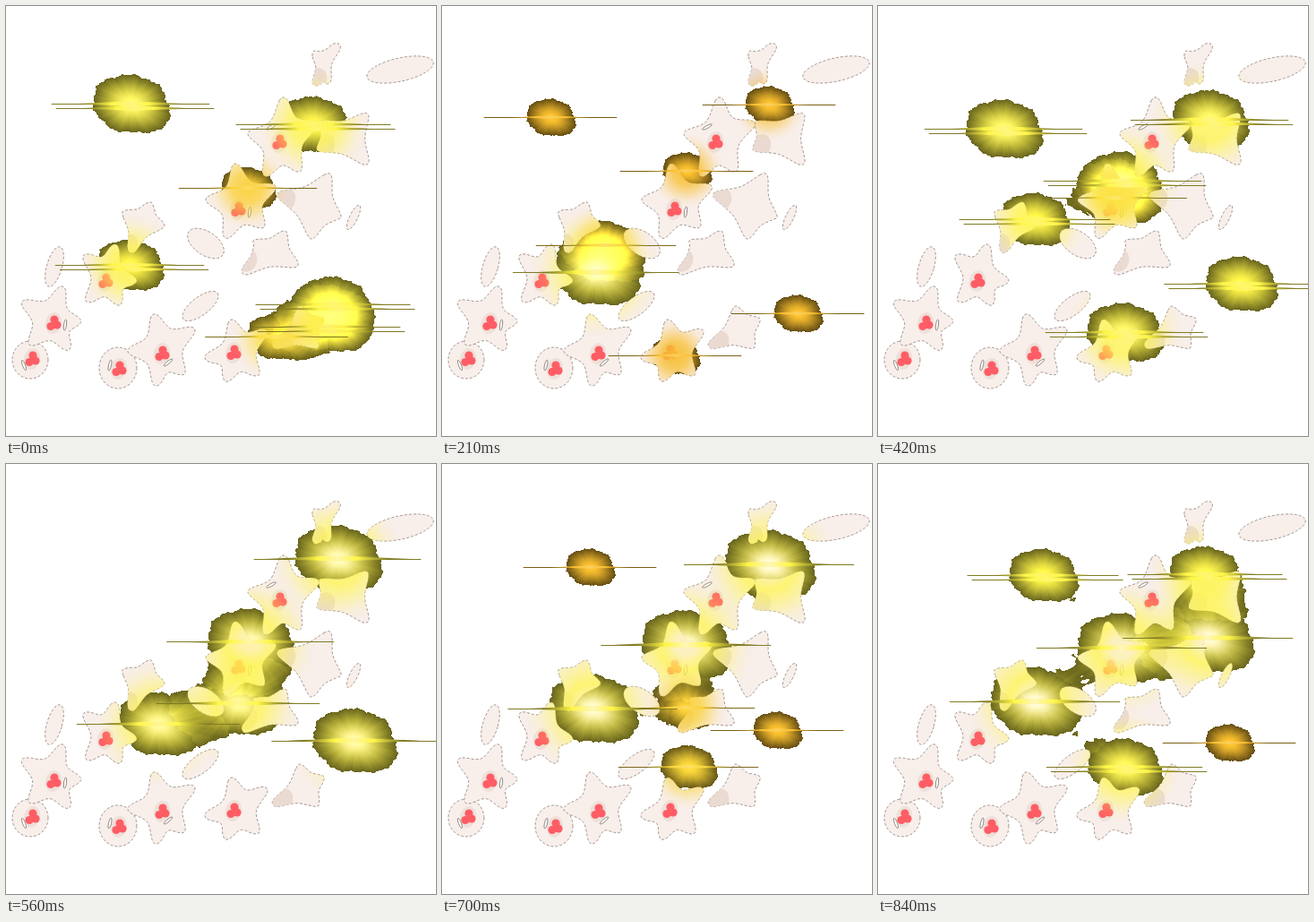
These frames come from a looping animation (480x480 px, 910 ms). An HTML page with a canvas:

```html
<!DOCTYPE html>
<html lang="en">
<head>
<meta charset="utf-8">
<title>Sparkling stars</title>
<style>
  html, body { margin: 0; width: 100%; height: 100%; overflow: hidden; background: #fff; }
  canvas { display: block; width: 480px; height: 480px; }
</style>
</head>
<body>
<canvas id="stage" width="480" height="480"></canvas>
<script>
const SIZE = 480, STEP = 70, STEPS = 13, TAU = Math.PI * 2;
const stage = document.getElementById('stage').getContext('2d');

function layer() {
  const c = document.createElement('canvas');
  c.width = c.height = SIZE;
  return c.getContext('2d');
}

const mix = (a, b, t) => a + (b - a) * t;
const clamp = v => Math.max(0, Math.min(1, v));
const blend = (a, b, t) => a.map((v, i) => mix(v, b[i], t));
const rgba = (c, a = 1) => `rgba(${c.map(Math.round).join()},${a})`;

function pairs(flat) {
  const out = [];
  for (let i = 0; i < flat.length; i += 2) out.push([flat[i], flat[i + 1]]);
  return out;
}

// Closed Catmull-Rom curve through the points.
function smooth(pts) {
  const p = new Path2D(), n = pts.length, at = i => pts[(i + n) % n];
  p.moveTo(...pts[0]);
  for (let i = 0; i < n; i++) {
    const [a, b, c, d] = [at(i - 1), at(i), at(i + 1), at(i + 2)];
    p.bezierCurveTo(b[0] + (c[0] - a[0]) / 6, b[1] + (c[1] - a[1]) / 6,
                    c[0] - (d[0] - b[0]) / 6, c[1] - (d[1] - b[1]) / 6, c[0], c[1]);
  }
  p.closePath();
  return p;
}

function ellipse(x, y, rx, ry, turn = 0) {
  const p = new Path2D();
  p.ellipse(x, y, rx, ry, turn, 0, TAU);
  return p;
}

/* ---- pale stars and petals ---- */

const art = layer();

function fill(path, color) {
  art.fillStyle = color;
  art.fill(path);
}

function body(path) {
  fill(path, '#f8eeea');
  art.strokeStyle = 'rgba(75,55,45,.7)';
  art.lineWidth = .7;
  art.setLineDash([3, 2]);
  art.stroke(path);
  art.setLineDash([]);
}

// Rounded tips, clockwise, with a valley between neighbours.
function tipped(depth, flat) {
  const tips = pairs(flat), n = tips.length, pts = [];
  const cx = tips.reduce((s, t) => s + t[0], 0) / n;
  const cy = tips.reduce((s, t) => s + t[1], 0) / n;
  tips.forEach(([x, y], i) => {
    const [nx, ny] = tips[(i + 1) % n];
    const d = Math.hypot(x - cx, y - cy), ux = (x - cx) / d, uy = (y - cy) / d;
    const bx = x - ux * 4, by = y - uy * 4;
    pts.push([bx + uy * 5, by - ux * 5], [x, y], [bx - uy * 5, by + ux * 5],
             [mix(cx, (x + nx) / 2, depth), mix(cy, (y + ny) / 2, depth)]);
  });
  return smooth(pts);
}

function heart(x, y) {
  fill(ellipse(x, y, 9, 12, .2), '#eee0d9');
  for (const [dx, dy] of [[1, -4], [-3, 3.5], [4, 2]])
    fill(ellipse(x + dx, y + dy, 4.6, 4.6), '#ff5d65');
}

function slit(x, y, turn) {
  const p = ellipse(x, y, 6, 1.5, turn);
  fill(p, '#fff');
  art.strokeStyle = '#776b66';
  art.lineWidth = .8;
  art.stroke(p);
}

function star(...tips) {
  body(tipped(.75, tips));
}

// A star seen from the side, darker at one corner.
function petal(shadeX, shadeY, ...tips) {
  const path = tipped(.88, tips);
  body(path);
  art.save();
  art.clip(path);
  fill(ellipse(shadeX, shadeY, 11, 13, .4), '#eadad2');
  art.restore();
}

petal(347, 82, 344, 50, 371, 42, 359, 87, 345, 89);
petal(356, 156, 349, 130, 404, 121, 404, 176, 347, 160);
petal(312, 216, 361, 187, 374, 236, 341, 260, 303, 210);
petal(269, 284, 313, 252, 326, 289, 264, 298, 276, 262);
petal(136, 267, 130, 230, 162, 219, 177, 245, 139, 275);
petal(309, 375, 328, 335, 355, 349, 348, 382, 298, 380);

body(ellipse(440, 71, 38, 13, -.22));
body(ellipse(388, 236, 4.5, 15, .45));
body(ellipse(223, 265, 23, 13, .6));
body(ellipse(54, 291, 8.5, 23, .28));
body(ellipse(217, 335, 24, 10, -.65));
body(ellipse(27, 395, 20, 21));
body(ellipse(125, 404, 21, 23));

star(310, 102, 349, 130, 328, 185, 289, 190, 270, 142);
star(256, 176, 301, 201, 288, 247, 245, 259, 223, 216);
star(122, 266, 146, 307, 127, 334, 90, 330, 87, 278);
star(63, 313, 84, 352, 70, 384, 26, 378, 18, 330);
star(165, 344, 210, 360, 199, 411, 167, 424, 136, 385);
star(252, 350, 291, 362, 282, 412, 245, 419, 222, 393);

pairs([305, 152, 259, 227, 111, 307, 53, 354, 29, 394, 126, 405, 174, 388, 254, 387])
  .forEach(([x, y]) => heart(x, y));

slit(296, 135, -.5);
slit(272, 230, 1.7);
slit(66, 356, 1.7);
slit(20, 401, 1.2);
slit(116, 401, 1.8);
slit(181, 398, -.7);

/* ---- sparks ---- */

const sparks = [];

// Lives for `life` steps and moves evenly through its points.
function spark(born, age, life, ...flat) {
  sparks.push({ born, age, life, pts: pairs(flat) });
}

// upper left
spark(0, 3, 2, 139, 109, 136, 116);
spark(3, 0, 2, 121, 124, 171, 121);
spark(6, 3, 1, 140, 137);
spark(10, 0, 2, 165, 115, 184, 124);
// upper right
spark(0, 2.5, 2, 343, 132, 354, 116);
spark(3, 0, 8, 365, 110, 370, 130, 370, 102, 362, 118);
spark(5, 1.5, 0, 372, 150);
spark(11, 6, 1, 366, 178, 368, 194);
spark(12, 2.5, 0, 365, 123);
// middle
spark(0, .5, 2, 270, 203, 272, 196);
spark(3, 0, 2, 273, 184, 275, 217);
spark(6, 3, 6, 273, 195, 272, 205);
spark(6, 1, 0, 265, 214);
spark(7, 3, 2, 250, 262, 268, 272);
spark(10, .5, 1, 272, 272);
// left
spark(0, 1.7, 4, 138, 289, 183, 300);
spark(3, .7, 2, 183, 267, 170, 267);
spark(5, 1.5, 0, 189, 285);
spark(6, 2, 6, 175, 238, 170, 290, 168, 273, 175, 265);
// right
spark(5, 0, 0, 402, 292);
spark(6, 2.3, 3, 405, 310, 380, 308);
spark(10, 0, 1, 374, 297);
spark(12, 0, 0, 392, 311);
// bottom
spark(0, 2.5, 2, 365, 333, 372, 338);
spark(0, 1.5, 0, 358, 358);
spark(0, 1, 2, 302, 369, 280, 380);
spark(3, 0, 1, 397, 343);
spark(3, 0, 4, 260, 390, 275, 368, 275, 360);
spark(5, 1, 0, 274, 330);
spark(10, .7, 2, 275, 338);

function pose({ born, age, life, pts }, step) {
  const t = step - born;
  if (t < 0 || t > life) return null;
  const u = life ? t / life * (pts.length - 1) : 0;
  const i = Math.floor(u), a = pts[i], b = pts[i + 1] || a;
  const [x, y] = blend(a, b, u - i);
  const size = 27 + 23 * (1 - (1 - clamp((age + t) / 7)) ** 2);
  const warm = clamp((size - 27) / 10);
  return {
    x, y, size,
    color: blend([248, 190, 46], [255, 246, 72], warm),
    white: clamp((size - 40) / 10),
    twin: size > 35 && size < 44
  };
}

// Ragged outline with a tail to the lower right.
function reach(a) {
  return .95 + .22 * Math.max(0, Math.cos(a - .68)) ** 10
    + .1 * Math.max(0, Math.cos(a + 2.45)) ** 4
    + .025 * Math.sin(a * 7) + .02 * Math.sin(a * 17 + 1) + .012 * Math.sin(a * 41);
}

const RIM = .41;
const clouds = layer();
const power = new Float32Array(SIZE * SIZE);
const light = new Float32Array(SIZE * SIZE * 3);

// Sums the light of all sparks and cuts it hard where it gets too dark.
function drawClouds(live) {
  power.fill(0);
  light.fill(0);
  for (const { x, y, size, color, white } of live) {
    const r = size * 1.9;
    const x0 = Math.max(0, Math.floor(x - r)), x1 = Math.min(SIZE, x + r);
    const y0 = Math.max(0, Math.floor(y - r)), y1 = Math.min(SIZE, y + r);
    for (let py = y0; py < y1; py++) for (let px = x0; px < x1; px++) {
      const dx = px - x, dy = (py - y) * 1.27;
      const d = Math.hypot(dx, dy) / (size * reach(Math.atan2(dy, dx)));
      if (d > 1.7) continue;
      const glow = 1.04 * Math.exp(-.93 * d * d);
      const core = white * Math.exp(-6 * d * d);
      const i = py * SIZE + px;
      power[i] += glow;
      for (let c = 0; c < 3; c++) light[i * 3 + c] += color[c] * glow;
      light[i * 3 + 2] += 150 * core;
    }
  }
  const img = clouds.createImageData(SIZE, SIZE);
  for (let i = 0; i < power.length; i++) {
    if (power[i] < RIM) continue;
    for (let c = 0; c < 3; c++) img.data[i * 4 + c] = light[i * 3 + c];
    img.data[i * 4 + 3] = 255;
  }
  clouds.putImageData(img, 0, 0);
}

function gradient(g, stops) {
  stops.forEach(([at, c]) => g.addColorStop(at, c));
  return g;
}

function drawTint(ctx, { x, y, size, color, white }) {
  const core = blend(color, [253, 240, 215], white * .8);
  ctx.fillStyle = gradient(ctx.createRadialGradient(x, y, 0, x, y, size * 1.5), [
    [0, rgba(core, .9)], [.15, rgba(core, .86)], [.38, rgba(color, .74)],
    [.62, rgba(color, .4)], [.82, rgba(color, .12)], [1, rgba(color, 0)]]);
  ctx.fillRect(0, 0, SIZE, SIZE);
}

function drawStreak(ctx, x, y, { size, color, white }) {
  const half = 50 + size * .9, w = size * 1.7, h = size / 15;
  const rim = rgba(color.map(v => v * .5)), mid = rgba(color.map(v => v * .7));
  const core = rgba(blend(color, [255, 246, 200], .3 + white * .6));
  ctx.fillStyle = gradient(ctx.createLinearGradient(x - half, 0, x + half, 0), [
    [0, rim], [.2, rim], [.28, mid], [.38, rgba(color)], [.5, core],
    [.62, rgba(color)], [.72, mid], [.8, rim], [1, rim]]);
  ctx.fillRect(x - half, Math.round(y), half * 2, 1);
  ctx.beginPath();
  ctx.moveTo(x - w, y + .5);
  ctx.quadraticCurveTo(x - w * .4, y - h * .5, x, y - h);
  ctx.quadraticCurveTo(x + w * .4, y - h * .5, x + w, y + .5);
  ctx.quadraticCurveTo(x + w * .4, y + h * .5, x, y + h);
  ctx.quadraticCurveTo(x - w * .4, y + h * .5, x - w, y + .5);
  ctx.fill();
}

const lit = layer();

function draw(step) {
  const live = sparks.map(s => pose(s, step)).filter(Boolean);
  drawClouds(live);

  lit.globalCompositeOperation = 'copy';
  lit.drawImage(art.canvas, 0, 0);
  lit.globalCompositeOperation = 'source-atop';
  live.forEach(s => drawTint(lit, s));

  stage.fillStyle = '#fff';
  stage.fillRect(0, 0, SIZE, SIZE);
  stage.drawImage(clouds.canvas, 0, 0);
  stage.drawImage(lit.canvas, 0, 0);
  for (const s of live) {
    drawStreak(stage, s.x, s.y, s);
    if (s.twin) drawStreak(stage, s.x + 5, s.y + 5, s);
  }
}

let shown = 0;
const start = performance.now();

function tick() {
  const step = Math.floor(Math.max(0, performance.now() - start) / STEP) % STEPS;
  if (step !== shown) draw(shown = step);
  requestAnimationFrame(tick);
}

draw(0);
requestAnimationFrame(tick);
</script>
</body>
</html>
```
